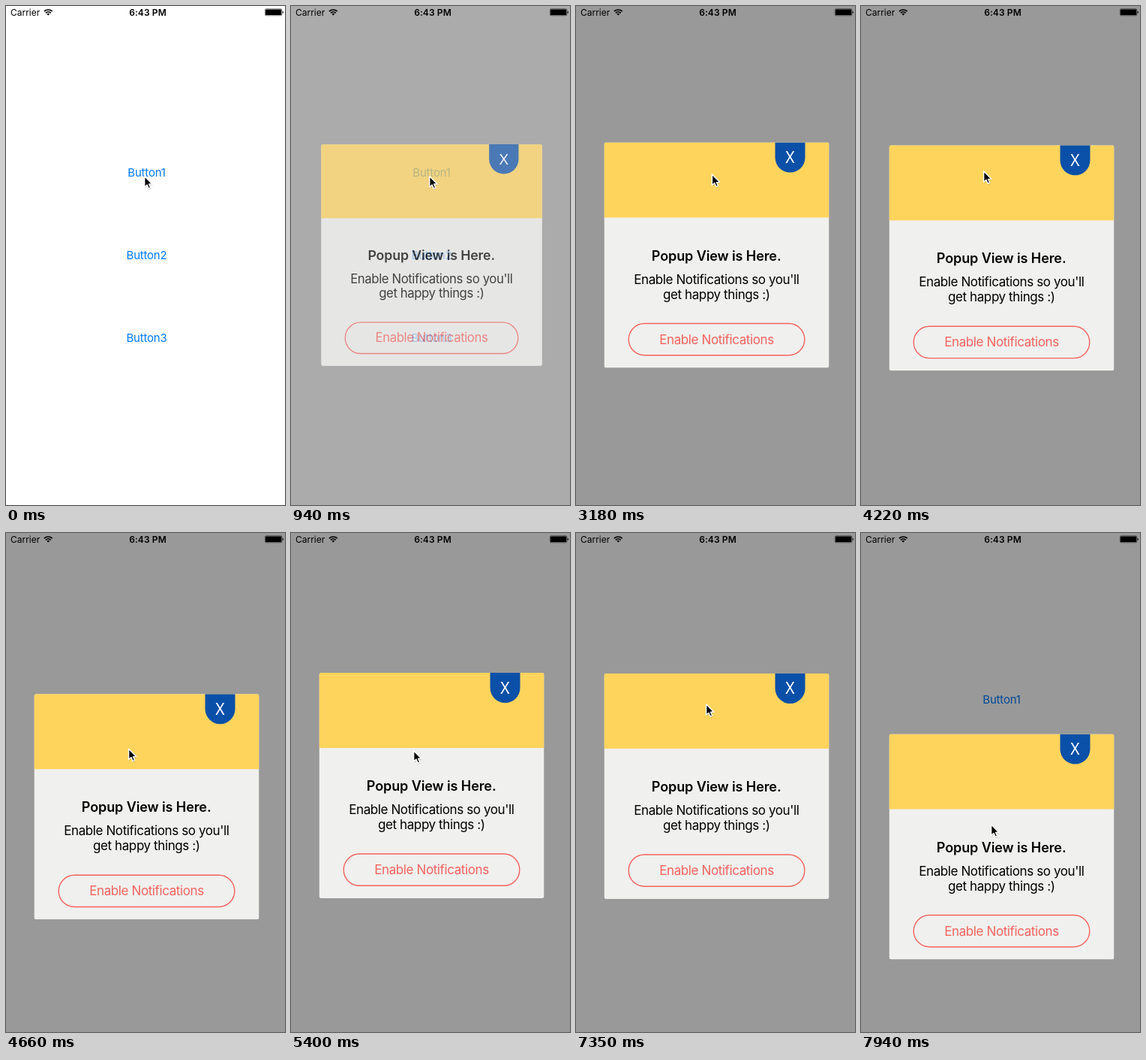
Write an HTML page that moves like this. It is 372 by 664 pixels and loops after 8 s.

```html
<!DOCTYPE html>
<html lang="en">
<head>
<meta charset="utf-8">
<title>Popup drag</title>
<style>
  html, body { margin: 0; width: 100%; height: 100%; overflow: hidden; background: #fff; }
  svg { display: block; width: 372px; height: 664px; }
  text { font-family: Inter, "Open Sans", sans-serif; text-anchor: middle; }
  .status { font-size: 12px; }
  .link { font-size: 15px; letter-spacing: -.2px; fill: #007aff; }
  .title { font-size: 18px; font-weight: 600; letter-spacing: -.1px; }
  .body { font-size: 17px; letter-spacing: -.39px; }
  .cta { fill: #f4645f; }
  .close { font: 400 21px "Noto Sans", "Open Sans", sans-serif; fill: #fff; }
</style>
</head>
<body>
<svg viewBox="0 0 372 664">
  <rect width="372" height="664" fill="#fff"/>
  <text class="link" id="pressed" x="187.5" y="227.3">Button1</text>
  <text class="link" x="187.5" y="337.3">Button2</text>
  <text class="link" x="187.5" y="447.3">Button3</text>

  <g id="overlay">
    <rect width="372" height="664" opacity=".4"/>
    <g id="popup">
      <clipPath id="card"><rect width="300" height="300" rx="3"/></clipPath>
      <g clip-path="url(#card)">
        <rect width="300" height="300" fill="#f0f0ee"/>
        <rect width="300" height="100" fill="#ffd45c"/>
        <path d="M228 0H268V20A20 20 0 0 1 228 20Z" fill="#0b50a8"/>
      </g>
      <text class="close" x="248" y="27.5">X</text>
      <text class="title" x="149.7" y="157">Popup View is Here.</text>
      <text class="body" x="149.8" y="188">Enable Notifications so you'll</text>
      <text class="body" x="149.8" y="208">get happy things :)</text>
      <rect x="32.7" y="241" width="234.6" height="42.3" rx="21.1" fill="none" stroke="#f4645f" stroke-width="1.4"/>
      <text class="body cta" x="150" y="268">Enable Notifications</text>
    </g>
  </g>

  <text class="status" x="25.6" y="12.6">Carrier</text>
  <g fill="none" stroke="#000" stroke-width="1.7">
    <path d="M50.9 7.2A7.7 7.7 0 0 1 61.7 7.2M52.9 9.3A4.9 4.9 0 0 1 59.7 9.3"/>
    <path d="M56.3 12.6L54.4 10.7A2.7 2.7 0 0 1 58.2 10.7Z" fill="#000" stroke="none"/>
  </g>
  <text class="status" x="189" y="12.6" font-weight="600" letter-spacing=".1">6:43 PM</text>
  <rect x="345.3" y="3.8" width="22.6" height="9" rx="1.6" fill="none" stroke="#000" stroke-width=".5"/>
  <rect x="346" y="4.5" width="21.2" height="7.6" rx=".9"/>
  <path d="M368.7 6.7A1.7 1.7 0 0 1 368.7 9.9Z"/>

  <g id="cursor">
    <path d="M.8 2V16L4 13L6.2 18L8.8 17L6.8 12.2H11Z" opacity=".18"/>
    <path d="M0 0V14.4L3.3 11.4L5.6 16.4L8.1 15.3L5.9 10.5H10.3Z" stroke="#fff" stroke-width="1.4" stroke-linejoin="round"/>
  </g>
</svg>
<script>
const LOOP = 8000;
const TICK = 146; // every movement advances in ticks

const clamp = k => Math.min(1, Math.max(0, k));
const smooth = k => k * k * (3 - 2 * k);
const pull = k => smooth(k) ** 1.22;
const settle = k => 1 - (1 - smooth(k)) ** 2;
const mix = (a, b, k) => a + (b - a) * k;
const ticks = (t, start) => t < start ? 0 : Math.floor((t - start) / TICK) + 1;

// The pointer and the popup's drag offset glide from each pose to the next.
const rest = { x: 184.7, y: 226.5, drag: 0 };
const moves = [
  { start: 3180, steps: 4, ease: smooth, x: 163.6, y: 211, drag: 0 },
  { start: 4220, steps: 5, ease: smooth, x: 163.6, y: 296, drag: 36.5 },
  { start: 5100, steps: 5, ease: settle, x: 163.6, y: 288.8, drag: 0 },
  { start: 6150, steps: 4, ease: smooth, x: 171, y: 198, drag: 0 },
  { start: 6734, steps: 2, ease: smooth, x: 173.6, y: 217, drag: 0 },
  { start: 7350, steps: 5, ease: pull, x: 173.6, y: 388, drag: 86 }
];

function poseAt(t) {
  return moves.reduce((pose, move) => {
    const k = move.ease(clamp(ticks(t, move.start) / move.steps));
    return {
      x: mix(pose.x, move.x, k),
      y: mix(pose.y, move.y, k),
      drag: mix(pose.drag, move.drag, k)
    };
  }, rest);
}

function set(id, attributes) {
  const node = document.getElementById(id);
  for (const name in attributes) node.setAttribute(name, attributes[name]);
}

function draw(now) {
  const t = Math.max(0, now - start) % LOOP;
  const shown = smooth(clamp((ticks(t, 790) - .53) / 2));
  const { x, y, drag } = poseAt(t);
  set("pressed", { opacity: t < 500 ? 1 : mix(.2, 1, shown) });
  set("overlay", { opacity: shown });
  set("popup", {
    opacity: shown,
    transform: `translate(187.5 ${331.5 + drag}) scale(${mix(.9, 1, shown)}) translate(-150 -150)`
  });
  set("cursor", { transform: `translate(${x} ${y})` });
  requestAnimationFrame(draw);
}

const start = performance.now();
draw(start);
</script>
</body>
</html>
```
